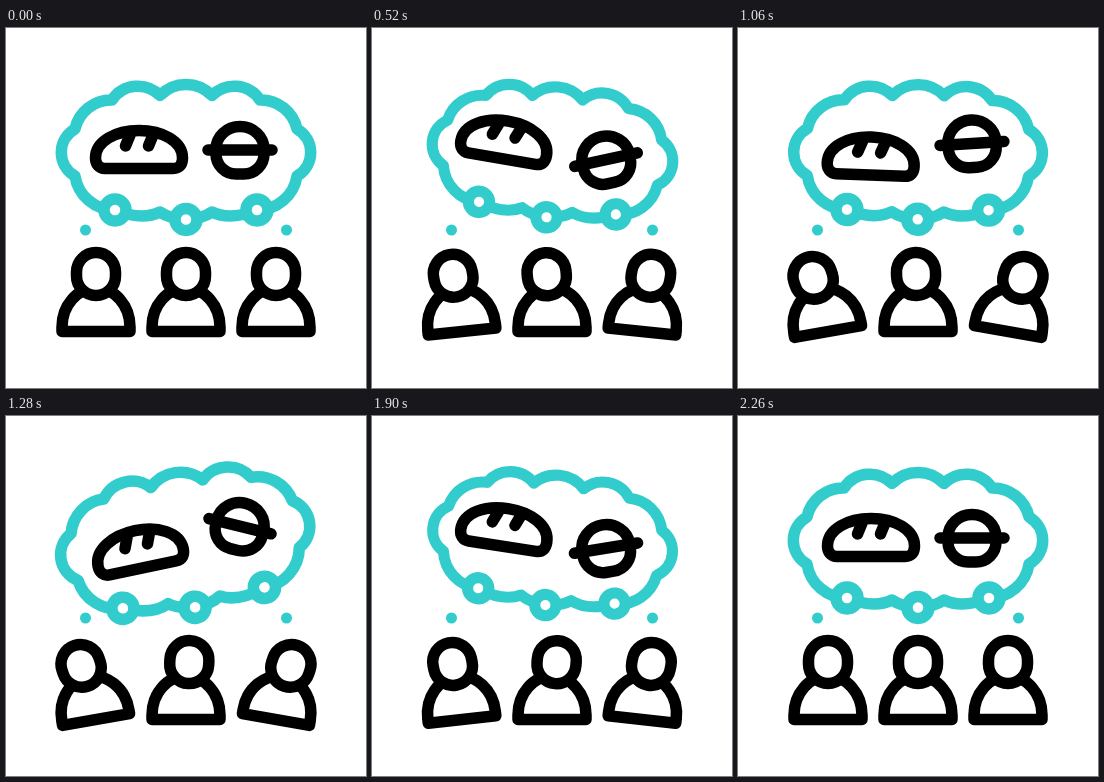
These frames come from a looping animation (360 px wide and 360 px high, 2400 ms). An HTML page:

```html
<!DOCTYPE html>
<html lang="en">
<head>
<meta charset="utf-8">
<title>Thinking about bread</title>
<style>
  html, body { margin: 0; width: 100%; height: 100%; overflow: hidden; background: #fff; }
  svg { display: block; width: 100vw; height: 100vh; }
  .ink { fill: none; stroke: #000; stroke-width: 11.5; stroke-linecap: round; stroke-linejoin: round; }
  .teal { fill: none; stroke: #33cccc; stroke-width: 11.5; stroke-linejoin: round; }
  .solid { fill: #fff; }
</style>
</head>
<body>
<svg viewBox="0 0 360 360">
  <defs>
    <path id="body" d="M-34 303.5V299A34 39 0 0 1 34 299V303.5Z"/>
    <rect id="head" x="-19.5" y="224.5" width="39" height="43" rx="19.5"/>
  </defs>
  <g id="cloud" class="teal">
    <path d="M109 182A40 40 0 0 1 69 148A27 27 0 0 1 69 101A37 37 0 0 1 106 72A31 31 0 0 1 154 67.5
             A36 36 0 0 1 206 67.5A31 31 0 0 1 254 72A37 37 0 0 1 291 101A27 27 0 0 1 291 148A40 40 0 0 1 251 182
             Q224 193 206 184Q196 191 180 191Q164 191 154 184Q136 193 109 182Z"/>
    <g class="solid">
      <circle cx="109" cy="182" r="11"/>
      <circle cx="180" cy="191.500" r="11"/>
      <circle cx="251" cy="182" r="11"/>
    </g>
  </g>
  <g fill="#33cccc">
    <circle cx="79.500" cy="202" r="5.500"/>
    <circle cx="280.500" cy="202" r="5.500"/>
  </g>
  <g id="bread" class="ink">
    <path d="M99 140.500H167C174 140.500 176.500 136 176.500 130C176.500 113 156 102.500 133 102.500
             S89.500 113 89.500 130C89.500 136 93 140.500 99 140.500Z"/>
    <path d="M124 107L119.500 118M147 107L142.500 118"/>
  </g>
  <g id="bun" class="ink">
    <path d="M210 121A24 22.500 0 0 1 258 121V126A20 20 0 0 1 238 146H230A20 20 0 0 1 210 126Z"/>
    <path d="M202 122H266"/>
  </g>
  <g id="people" class="ink"></g>
</svg>
<script>
const LOOP = 2400, STEP = 20;
const BOB = [220, 640, 740, 1220, 1670, 1780, 2260];
const SWING = [220, 780, 1340, 1860, 2260];
const LEAN = [220, 760, 1640, 2260];
const NOD = [220, 600, 780, 1500, 1740, 2260];

const $ = id => document.getElementById(id);
const ease = p => p * p * (3 - 2 * p);

// Eased value at time t between matching times and values.
function curve(t, times, values) {
  if (t <= times[0]) return values[0];
  for (let i = 1; i < times.length; i++) {
    if (t < times[i]) {
      const p = ease((t - times[i - 1]) / (times[i] - times[i - 1]));
      return values[i - 1] + (values[i] - values[i - 1]) * p;
    }
  }
  return values[values.length - 1];
}

const people = [90, 180, 270].map(x => {
  const add = (parent, tag, attrs) => {
    const node = document.createElementNS("http://www.w3.org/2000/svg", tag);
    for (const key in attrs) node.setAttribute(key, attrs[key]);
    return parent.appendChild(node);
  };
  const group = add($("people"), "g", {});
  add(group, "use", { href: "#body" });
  return { x, group, head: add(group, "use", { href: "#head", class: "solid" }) };
});

function place(node, x, y, angle, dy = 0, scale = 1) {
  node.setAttribute("transform",
    `translate(${x} ${y + dy}) rotate(${angle}) scale(${scale}) translate(${-x} ${-y})`);
}

function draw(t) {
  const bob = curve(t, BOB, [0, 12, 12, -13, 12, 12, 0]);
  const scale = curve(t, BOB, [1, 0.96, 0.96, 1.01, 0.96, 0.96, 1]);
  place($("cloud"), 180, 130, curve(t, SWING, [0, 9.5, -9, 6.6, 0]), 0, scale);
  place($("bread"), 133, 122, curve(t, SWING, [0, 17.5, -13, 9, 0]), -bob);
  place($("bun"), 234, 122, curve(t, SWING, [0, -22, 15, -9.5, 0]), bob);

  const lean = curve(t, LEAN, [0, 10, 10, 0]);
  const nod = curve(t, NOD, [0, -6, -6, 6, 6, 0]);
  people.forEach(({ x, group, head }, i) => {
    const side = i - 1;
    group.setAttribute("transform", `translate(${x}) rotate(${side * lean} 0 303)`);
    if (side) place(head, 0, 285, side * lean * 0.8, lean * 0.17);
    else place(head, 0, 303, nod);
  });
}

const start = performance.now();
function tick() {
  const t = (performance.now() - start) % LOOP;
  draw(Math.floor(t / STEP) * STEP);
  requestAnimationFrame(tick);
}
tick();
</script>
</body>
</html>
```
